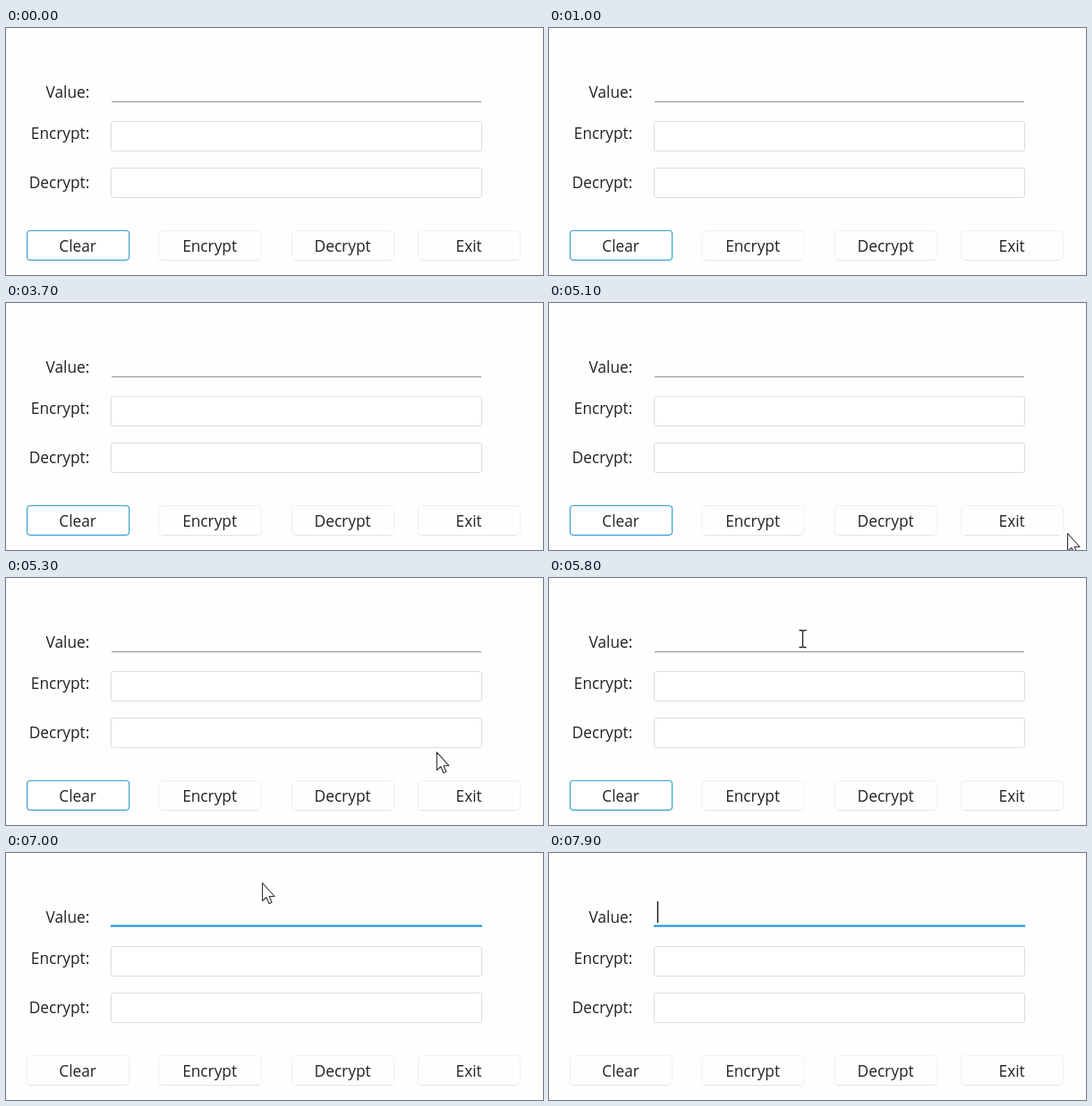
Animation of 600 by 276 pixels, one loop 8000 ms. Source, as an HTML page:

```html
<!DOCTYPE html>
<html lang="en">
<head>
<meta charset="utf-8">
<title>Encrypt form</title>
<style>
  html, body { margin: 0; width: 100%; height: 100%; overflow: hidden; background: #fefefe; }
  svg { display: block; width: 100%; height: 100%; }
  text { font: 17.3px "Open Sans", "Noto Sans", sans-serif; fill: #222; }
  .label { text-anchor: end; }
  .caption { text-anchor: middle; }
  .field { fill: #fff; stroke: #dcdcdc; }
  .button { fill: #fefefe; stroke: #f0f0f0; }
  .edge { stroke: #e2e2e2; }
  .active { fill: #fff; stroke: #3a9fd3; stroke-width: 1.2; }
</style>
</head>
<body>
<svg viewBox="0 0 600 276">
  <rect width="600" height="276" fill="#fefefe"/>
  <g id="form"></g>
  <path id="line" d="M118 82.5H531" stroke="#929292"/>
  <path id="focus" d="M117 81.5H532" stroke="#128cd8" stroke-width="2"/>
  <path id="caret" d="M121.5 54V78" stroke="#111" stroke-width="1.4"/>
  <path id="arrow" d="M.5 .5V20.5L5 16.5L8 23.5L11 22.2L8.2 15.5H14Z"
    fill="#fff" stroke="#333" stroke-width="1.1" stroke-linejoin="round"/>
  <path id="beam" d="M-4 -9.5H-1.2L0 -8.5L1.2 -9.5H4M0 -8.5V8.5M-4 9.5H-1.2L0 8.5L1.2 9.5H4"
    fill="none" stroke="#222" stroke-width="1.3"/>
</svg>
<script>
const LOOP = 8000, STEP = 100;
const $ = id => document.getElementById(id);

const label = (s, y) => `<text class="label" x="93.3" y="${y}">${s}</text>`;
const box = (cls, x, y, w, h, r) =>
  `<rect class="${cls}" x="${x}" y="${y}" width="${w}" height="${h}" rx="${r}"/>`;
const button = (s, x) =>
  box('button', x, 226.5, 114, 33, 4) +
  `<path class="edge" d="M${x + 4} 259.5h106"/>`;
const caption = (s, x) =>
  `<text class="caption" x="${x + 56.6}" y="249.5">${s}</text>`;

const buttons = [['Clear', 23.5], ['Encrypt', 171], ['Decrypt', 319.5], ['Exit', 460.5]];
$('form').innerHTML =
  label('Value:', 78) + label('Encrypt:', 124) + label('Decrypt:', 179) +
  box('field', 117.5, 104.5, 414, 33, 2) + box('field', 117.5, 156.5, 414, 33, 2) +
  buttons.map(b => button(...b)).join('') +
  box('active', 23.6, 226.5, 114, 32.8, 3.5).replace('<rect', '<rect id="ring"') +
  buttons.map(b => caption(...b)).join('');

const show = (el, on) => el.setAttribute('visibility', on ? 'visible' : 'hidden');
const mix = (a, b, p) => a + (b - a) * p;
const travel = (a, b, p) => [mix(a[0], b[0], p), mix(a[1], b[1], p)];

// Pointer position, or null while it is off the stage
function pointer(t) {
  if (t >= 3200 && t < 3400) return travel([321, 69], [318, 38], (t - 3200) / 100);
  if (t >= 5100 && t < 5800) {
    const p = 1 - Math.pow(1 - (t - 5100) / 700, 1.2);
    return travel([579, 257], [283.5, 68], p);
  }
  if (t >= 5800 && t < 7000) return [283.5, 68];
  if (t >= 7000 && t < 7900) {
    return travel([286, 33], [439, 4], Math.max(0, (t - 7600) / 200));
  }
  return null;
}

const overField = ([x, y]) => x > 118 && x < 531 &&
  [[52, 82], [104, 137], [157, 190]].some(([top, end]) => y >= top && y <= end);

function draw(time) {
  const t = Math.floor((time % LOOP) / STEP) * STEP;
  const focused = t >= 6300;
  show($('ring'), !focused);
  show($('line'), !focused);
  show($('focus'), focused);
  show($('caret'), focused && (t < 7000 || t >= 7600));

  const pos = pointer(t);
  const text = pos && overField(pos);
  show($('arrow'), pos && !text);
  show($('beam'), text);
  if (pos) $(text ? 'beam' : 'arrow').setAttribute('transform', `translate(${pos})`);
}

const start = performance.now();
function tick() {
  draw(performance.now() - start);
  requestAnimationFrame(tick);
}
tick();
</script>
</body>
</html>
```
